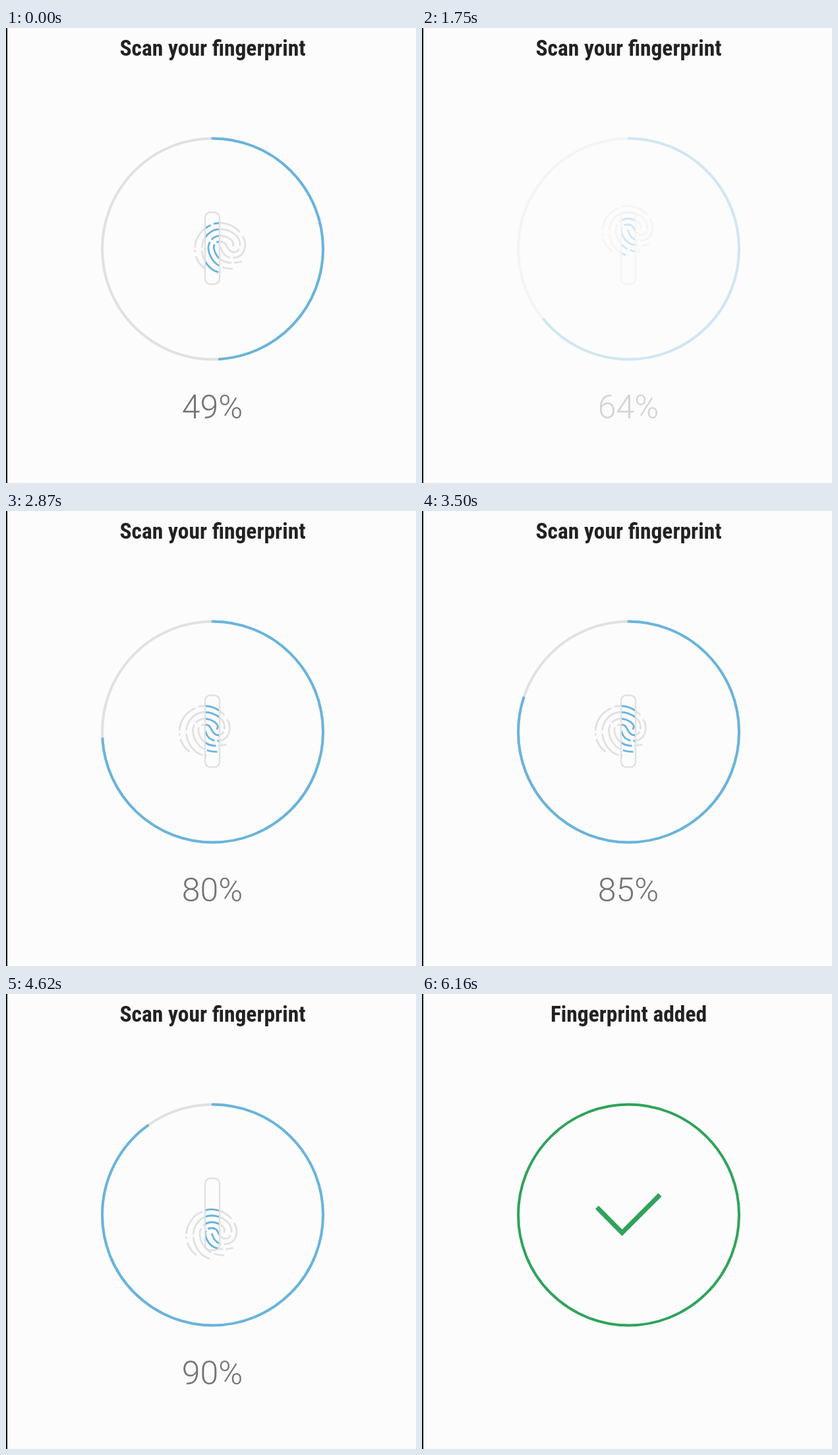
Recreate the animation shown at these times as an HTML page. Size 622 by 690 pixels, loop 6650 ms.

```html
<!DOCTYPE html>
<html lang="en">
<head>
<meta charset="utf-8">
<title>Scan your fingerprint</title>
<style>
html, body { margin: 0; width: 100%; height: 100%; overflow: hidden; background: #fcfcfc; }
svg { display: block; width: 622px; height: 690px; fill: none; }
text { text-anchor: middle; }
#title { font: bold 33.5px "Roboto Condensed", Roboto, sans-serif; font-stretch: condensed; fill: #222; }
#label { font: 300 50px Roboto, sans-serif; fill: #747474; }
.grey { stroke: #e1e1e1; }
.blue { stroke: #69b4dc; }
.green { stroke: #2fa35b; }
.print { stroke-width: 2.8; }
</style>
</head>
<body>
<svg viewBox="0 0 622 690">
  <defs>
    <clipPath id="slot"><rect x="303" y="280" width="20" height="108" rx="7"/></clipPath>
    <g id="ridges" stroke-dasharray="44 4">
      <path d="M-14-35A38 38 0 0 0-38 6"/>
      <path d="M-37 12A38 38 0 0 0-23 31"/>
      <path d="M-10-37A39 39 0 0 1 30-24"/>
      <path d="M34-18C41-7 38 7 29 12S10 15 4 7L0-2"/>
      <path d="M0-29C-16-29-28-15-28 1S-16 36 2 37"/>
      <path d="M0-29C16-29 30-18 30-6S20 9 14 3S10-10 0-10S-12-2-7 8S10 26 33 20"/>
      <path d="M18-3C25-10 10-19 0-19S-19-10-18 1S-8 32 19 31"/>
    </g>
  </defs>
  <rect width="2" height="690" fill="#000"/>
  <text id="title" x="313.5" y="42"></text>
  <g id="scan">
    <g stroke-width="4">
      <circle class="grey" cx="313.5" cy="335" r="167.5"/>
      <circle id="arc" class="blue" cx="313.5" cy="335" r="167.5" pathLength="100"
        stroke-linecap="round" transform="rotate(-90 313.5 335)"/>
    </g>
    <use class="grey print finger" href="#ridges"/>
    <rect class="grey" x="302" y="279.5" width="22" height="109" rx="8" stroke-width="2.4" fill="#fcfcfc"/>
    <g clip-path="url(#slot)"><use class="blue print finger" href="#ridges"/></g>
    <text id="label" x="313" y="592"></text>
  </g>
  <g id="done" class="green">
    <circle cx="313.5" cy="335" r="167.5" stroke-width="4"/>
    <path id="tick" d="M265.5 323.5L303.5 362L361 304.5" stroke-width="7" pathLength="100"/>
  </g>
</svg>
<script>
const LOOP = 6650, STEP = 70, SWEEP = 210, DONE = 5600;
// [time, percent]: the label jumps, then the arc follows
const touches = [[-500, 49], [140, 54], [840, 60], [1220, 64], [1960, 70], [2190, 74],
  [2870, 80], [3500, 85], [4410, 90], [4760, 95], [5250, 100]];
// [time, x, y]: the print moves while the screen is faded out
const places = [[-500, 325, 334], [560, 312, 365], [1690, 312, 308], [2580, 301.5, 334], [4200, 312, 365]];

const el = id => document.getElementById(id);
const clamp = v => Math.max(0, Math.min(1, v));
const current = (list, t) => list.findLastIndex(item => item[0] <= t);

function fade(t) {
  return Math.min(...places.map(([at]) => t < at ? clamp((at - t) / 170) : clamp((t - at) / 200)));
}

function draw(t) {
  const done = t >= DONE;
  el('title').textContent = done ? 'Fingerprint added' : 'Scan your fingerprint';
  el('scan').style.display = done ? 'none' : '';
  el('done').style.display = done ? '' : 'none';
  if (done) {
    const p = clamp((t - DONE + STEP) / 420);
    el('tick').setAttribute('stroke-dasharray', `${100 * p} 200`);
    return;
  }
  const i = current(touches, t);
  const [at, percent] = touches[i];
  const from = i ? touches[i - 1][1] : percent;
  const arc = from + (percent - from) * clamp((t - at) / SWEEP);
  el('label').textContent = percent + '%';
  el('arc').setAttribute('stroke-dasharray', `${arc} 200`);
  el('scan').setAttribute('opacity', fade(t));
  const [, x, y] = places[current(places, t)];
  for (const print of document.querySelectorAll('.finger'))
    print.setAttribute('transform', `translate(${x} ${y})`);
}

function tick(now) {
  draw(Math.floor(now % LOOP / STEP) * STEP);
  requestAnimationFrame(tick);
}
tick(performance.now());
</script>
</body>
</html>
```
